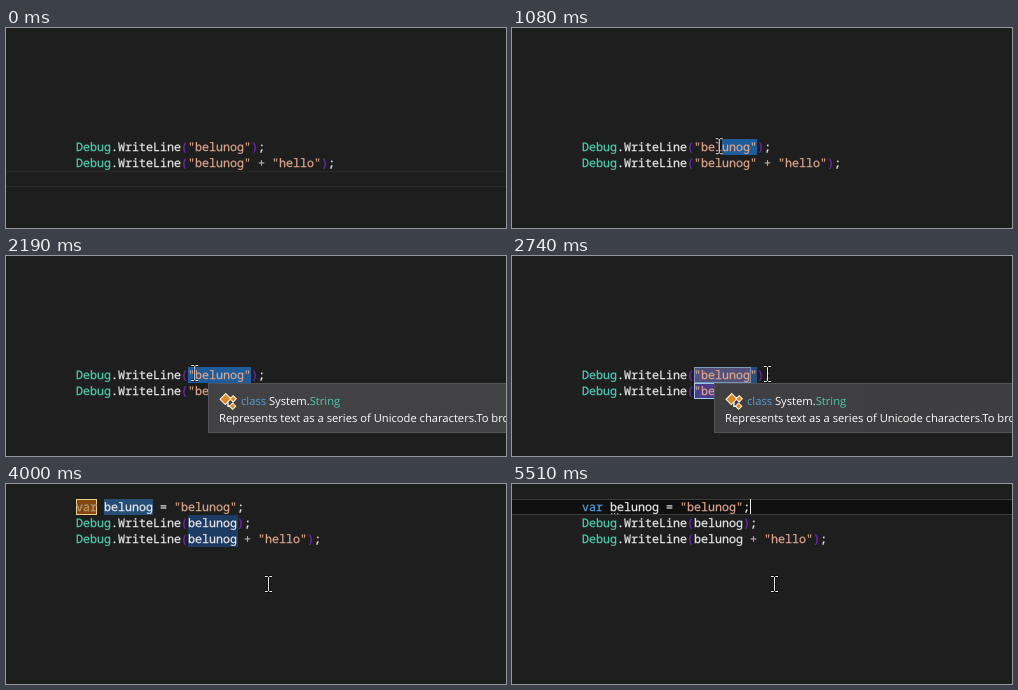
Animation, 500 px wide and 200 px high, one loop 5.97 s. Source, as an HTML page:

```html
<!DOCTYPE html>
<html lang="en">
<head>
<meta charset="utf-8">
<title>Introduce variable</title>
<style>
  html, body { margin: 0; width: 100%; height: 100%; overflow: hidden; background: #1e1e1e; }
  svg { display: block; width: 500px; height: 200px; }
  text { white-space: pre; text-rendering: geometricPrecision; }
  .code { font: 11.667px "Noto Sans Mono", "DejaVu Sans Mono", monospace; stroke-width: .25; }
  .ui { font: 11.2px "Open Sans", "Noto Sans", sans-serif; fill: #fff; }
</style>
</head>
<body>
<svg id="stage" viewBox="0 0 500 200"></svg>
<script>
const LOOP = 5970;
const NAME = "belunog";
const LEFT = 70, CHAR = 7;
const C = {
  type: "#4ec9b0", plain: "#e6e6e6", string: "#d9a48c",
  paren: "#7427b8", keyword: "#569cd6", op: "#b8b8b8"
};

const rect = (x, y, w, h, fill, extra = "") =>
  `<rect x="${x}" y="${y}" width="${w}" height="${h}" fill="${fill}" ${extra}/>`;
const frame = (x, y, w, h, fill, stroke, extra = "") =>
  rect(x + .5, y + .5, w - 1, h - 1, fill, `stroke="${stroke}" ${extra}`);
const code = (x, y, s, color) =>
  `<text x="${x}" y="${y}" class="code" fill="${color}" stroke="${color}">${s}</text>`;
const label = (x, y, s) => `<text x="${x}" y="${y}" class="ui">${s}</text>`;
const group = (id, body) => `<g id="${id}">${body}</g>`;

// One code line from [text, colour] tokens on the character grid.
function codeLine(top, tokens) {
  let col = 0, out = "";
  for (const [s, color] of tokens) {
    out += code(LEFT + col * CHAR, top + 12, s, color);
    col += s.length;
  }
  return out;
}

const call = (...args) => [
  ["Debug", C.type], [".WriteLine", C.plain], ["(", C.paren],
  ...args, [")", C.paren], [";", C.plain]
];
const quoted = [`"${NAME}"`, C.string];
const named = [NAME, C.plain];
const hello = [[" + ", C.op], ['"hello"', C.string]];

const band = (top, fill, edge) =>
  rect(0, top, 500, 16, fill) + rect(0, top, 500, 1, edge) + rect(0, top + 15, 500, 1, edge);

const icon = `
  <g transform="translate(11.500 9.500) scale(1.05)" fill="#d98a24" stroke="#fff3e0">
    <path d="M10 5H12M8 8V13H11" fill="none" stroke="#f0f0f0" stroke-width="1.4"/>
    <path d="M6 1L11 6L5.500 11.500L.5 6.500Z"/>
    <path d="M13 3L16 6L13 9L10 6Z"/>
    <path d="M12.500 10L15.500 13L12.500 16L9.500 13Z"/>
  </g>`;

const tooltip =
  frame(0, 0, 420, 50, "#424245", "#535357", 'id="tipBox"') + icon +
  label(33, 22, `<tspan fill="${C.keyword}">class</tspan> System.<tspan fill="${C.type}">String</tspan>`) +
  label(11, 39, "Represents text as a series of Unicode characters.To browse");

const options = [NAME, "format", "message", "s", "value"];
const list =
  frame(92, 30, 93, 98, "#252526", "#434346") +
  rect(113, 32, 70, 19, "#3399ff") +
  options.map((s, i) => label(116, 45 + i * 19, s)).join("");

const occurrence = top => rect(182, top, 50, 16, "#1d3c63");
const dashes = top =>
  frame(182, top, 50, 16, "none", "#c3d2e4", 'stroke-dasharray="2 2"');

const beamPath = "M-3.500 -7.500H-1L0 -6.500L1 -7.500H3.500M0 -6.500V6.500M-3.500 7.500H-1L0 6.500L1 7.500H3.500";
const beam =
  `<path d="${beamPath}" fill="none" stroke="#000" stroke-opacity=".65" stroke-width="2.6"/>` +
  `<path d="${beamPath}" fill="none" stroke="#f0f0f0"/>`;

document.getElementById("stage").innerHTML =
  rect(0, 0, 500, 200, "#1e1e1e") +
  group("before",
    group("bandLow", band(143, "#1e1e1e", "#2a2a2a")) +
    rect(245, 111, 0, 16, "#1e5c9a", 'id="selection"') +
    group("matches",
      rect(238, 111, 7, 16, "#264f78") +
      frame(182, 111, 57, 16, "#535079", "#7c96ba") +
      frame(182, 127, 63, 16, "#4b3b8c", "#9cc8e8")) +
    codeLine(111, call(quoted)) +
    codeLine(127, call(quoted, ...hello))) +
  group("after",
    group("bandTop", band(15, "#0f0f0f", "#3c3c3c")) +
    group("typeBox", frame(70, 15, 21, 16, "#87450f", "#e8d28c")) +
    group("nameBox",
      rect(98, 15, 49, 16, "#264f78", 'id="nameFill"') +
      occurrence(31) + occurrence(47) +
      group("dashed", dashes(31) + dashes(47) + rect(97, 15, 1.5, 16, "#f02020"))) +
    codeLine(15, [["var", C.keyword], [" ", C.plain], named, [" = ", C.plain], quoted, [";", C.plain]]) +
    group("typeText", code(LEFT, 27, "var", "#c48845")) +
    codeLine(31, call(named)) +
    codeLine(47, call(named, ...hello)) +
    group("hint", [99, 102, 105].map(x => rect(x, 29, 1.3, 1.3, "#a0a0a0")).join("")) +
    group("caret", rect(238, 15, 1, 15, "#f0f0f0")) +
    group("list", list)) +
  group("panel", frame(202, 127, 149, 50, "#2d2d30", "#3f3f46")) +
  group("tip", tooltip) +
  group("beam", beam);

const el = {};
document.querySelectorAll("[id]").forEach(n => el[n.id] = n);

// Pointer moves: start, end, number of steps, target x, target y.
const START = [505, 140];
const moves = [
  [60, 550, 8, 250, 117.5],
  [700, 700, 1, 246.5, 118.5],
  [940, 1300, 6, 168, 118],
  [1370, 1520, 3, 187, 118],
  [1660, 1740, 2, 195.5, 117.5],
  [1820, 2040, 3, 199, 117],
  [2190, 2330, 3, 178.5, 117],
  [2400, 2740, 5, 255.5, 118],
  [2790, 2850, 2, 262.5, 100]
];

function pointer(t) {
  let [x, y] = START;
  for (const [t0, t1, n, tx, ty] of moves) {
    if (t < t0) break;
    const k = t >= t1 ? n : 1 + Math.floor((t - t0) / (t1 - t0) * (n - 1));
    const p = Math.sin(k / n * Math.PI / 2);
    x += (tx - x) * p;
    y += (ty - y) * p;
  }
  return [x, y];
}

const within = (t, a, b) => t >= a && t < b;
const show = (id, on) => el[id].style.display = on ? "" : "none";

function dragStart(t) {
  if (t >= 1300) return 182;
  const x = LEFT + Math.round((pointer(t)[0] - LEFT) / CHAR) * CHAR;
  return Math.max(182, Math.min(245, x));
}

function draw(t) {
  const [x, y] = pointer(t);
  el.beam.setAttribute("transform", `translate(${x} ${y})`);
  show("beam", t >= 60);

  show("before", t < 3530);
  show("bandLow", t < 1010);
  const matched = t >= 2610;
  show("matches", matched);
  const selected = within(t, 940, 2610);
  show("selection", selected);
  if (selected) {
    const from = dragStart(t);
    el.selection.setAttribute("x", from);
    el.selection.setAttribute("width", 245 - from);
  }

  const secondTip = within(t, 2040, 2790);
  show("tip", within(t, 620, 1010) || secondTip);
  el.tip.setAttribute("transform", `translate(${secondTip ? 202 : 251} 127)`);
  show("panel", within(t, 2610, 3390));
  el.tipBox.setAttribute("fill-opacity", matched ? .88 : 1);

  show("after", t >= 3530);
  const done = t >= 4900;
  show("typeBox", within(t, 3610, 4900));
  show("typeText", within(t, 3840, 4900));
  show("nameBox", within(t, 4000, 4900));
  el.nameFill.setAttribute("fill", t >= 4520 ? "#37836f" : "#264f78");
  show("dashed", t >= 4520);
  show("list", within(t, 4140, 4830));
  show("bandTop", done);
  show("hint", done);
  show("caret", within(t, 4900, 4970) || t >= 5510);
}

const begin = performance.now();
function tick() {
  draw((performance.now() - begin) % LOOP);
  requestAnimationFrame(tick);
}
draw(0);
requestAnimationFrame(tick);
</script>
</body>
</html>
```
